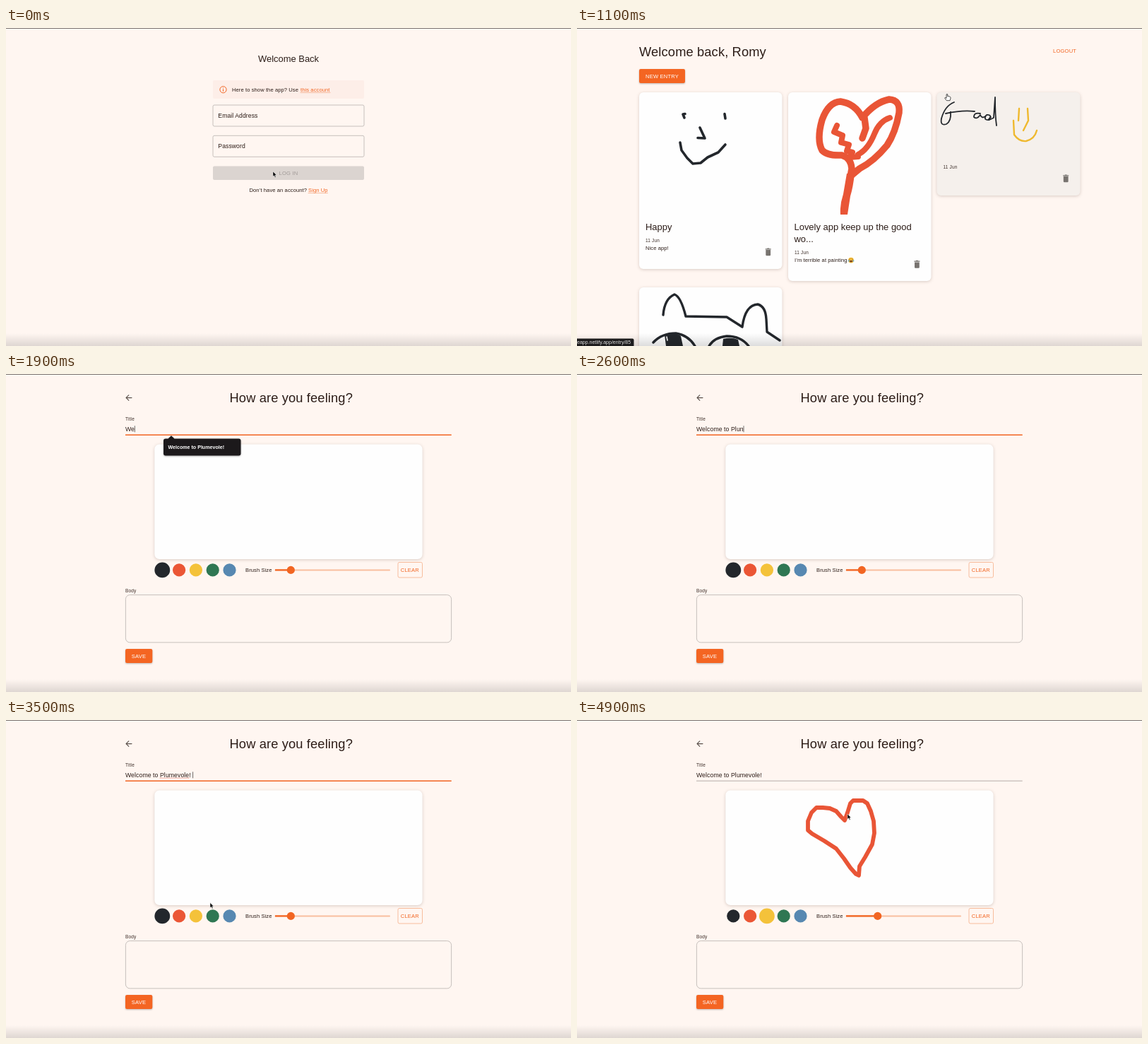
Recreate the animation shown at these times as an HTML page. Size 800 by 450 pixels, loop 5000 ms.

```html
<!DOCTYPE html>
<html lang="en">
<head>
<meta charset="utf-8">
<title>Mood journal</title>
<style>
html, body { margin: 0; width: 100%; height: 100%; overflow: hidden; background: #fff6f1; }
svg { display: block; width: 800px; height: 450px; font-family: "Liberation Sans", Arial, sans-serif; }
text { white-space: pre; }
.card { fill: #fefefe; filter: drop-shadow(0 1px 2px rgba(60, 30, 15, .2)); }
.line { fill: none; stroke-linecap: round; stroke-linejoin: round; }
</style>
</head>
<body>
<svg id="stage" viewBox="0 0 800 450"></svg>
<script>
const INK = '#2c1d18', ORANGE = '#f26522', GREY = '#c6c0bc', BLACK = '#23272c', RED = '#e95536';
const LOOP = 5000, STEP = 100;
const TITLE = 'Welcome to Plumevole! ';

// Markup helpers
const text = (x, y, s, size, fill = INK, gap = 0.08, more = '') =>
  `<text x="${x}" y="${y}" font-size="${size}" fill="${fill}" letter-spacing="${gap}" ${more}>${s}</text>`;
const body = (x, y, s, fill) => text(x, y, s, 7.6, fill);
const caps = (x, y, s, fill) => text(x, y, s, 7.55, fill, 0.215);
const small = (x, y, s) => text(x, y, s, 6.46, '#3f302b', 0.2);
const head = (x, y, s) => text(x, y, s, 18.3, INK, 0.135);
const box = (x, y, w, h, r, more) => `<rect x="${x}" y="${y}" width="${w}" height="${h}" rx="${r}" ${more}/>`;
const line = (d, color, w, more = '') =>
  `<path class="line" d="${d}" stroke="${color}" stroke-width="${w}" ${more}/>`;
const link = (x, y, s, w) => body(x, y, s, ORANGE) + line(`M${x} ${y + 1.4}h${w}`, '#f5a27a', 0.7);
const field = (y, s) =>
  box(293, y, 214, 30, 2, `fill="none" stroke="${GREY}"`) + text(300.3, y + 17.8, s, 8.65);
const button = (x, y, w, h, more = '') => box(x, y, w, h, 2.2,
  `fill="#f46522" style="filter:drop-shadow(0 1px 1px rgba(0,0,0,.25))" ${more}`);
const bin = (x, y) => `<g transform="translate(${x} ${y})" fill="#77736f">
  <path d="M-4 -4.8h2.2l.7 -.8h2.2l.7 .8h2.2v1.2h-8z"/><path d="M-3.4 -2.9h6.8v7a1.2 1.2 0 0 1 -1.2 1.2h-4.4a1.2 1.2 0 0 1 -1.2 -1.2z"/></g>`;

const login = `<g id="login">
  ${text(400, 48.3, 'Welcome Back', 12.95, INK, 0, 'text-anchor="middle"')}
  ${box(293, 74, 214, 26, 2, 'fill="#fdeee8"')}
  <circle cx="307.5" cy="87.2" r="4.6" fill="none" stroke="${ORANGE}"/>
  ${line('M307.5 86.8v2.6M307.5 84.8v.1', ORANGE, 1)}
  ${body(320, 90, 'Here to show the app? Use')}
  ${link(417, 90, 'this account', 42)}
  ${field(109, 'Email Address')}${field(152.3, 'Password')}
  ${box(293, 195.5, 214, 19.5, 2, 'fill="#dbd4d0"')}
  ${caps(386.5, 208.2, 'LOG IN', '#a19a97')}
  ${body(344.5, 232.2, 'Don’t have an account?')}
  ${link(428, 232.2, 'Sign Up', 27.5)}
</g>`;

const face = line('M153 121.5L150 122L152 127M209 121.5L210 128M174 141L181 156L171 155.5' +
  'M146 162L148 173L156 184L164 192L175 191L185 183L200 176L210 165', BLACK, 3.6);
const bigHeart =
  line('M404 127Q394 107 373 104Q356 105 347 130Q339 158 347 173Q354 181 375 180Q388 184 389 199L386 216' +
    'M404 127Q422 105 442 101Q458 102 456 120Q451 148 439 166Q420 189 400 199L388 209' +
    'M404 156L409 142L407 127', RED, 9.5) +
  line('M368 138L364 147L376 152L374 162L385 165L382 174L390 176L386 183L398 182' +
    'M443 127Q428 132 421 150Q412 172 398 179', RED, 8) +
  `<path d="M382 206L393 206Q391 225 387 238L383 264H373Q372 250 377 235Z" fill="${RED}"/>`;
const scrawl =
  line('M534 105Q521 110 516 128Q514 139 523 136Q530 132 529 119M522 121Q545 116 563 118' +
    'M571 121Q562 119 562 126Q566 130 571 123Q574 130 580 123Q588 122 584 130Q575 131 579 124' +
    'M586 126Q578 133 590 127L592 98Q592 124 594 138', BLACK, 1.8) +
  line('M626 114L625 131M638 114L639 131L632 145M618 131L619 151Q626 161 636 160Q648 157 651 145',
    '#efb92f', 2.4);
const cat =
  line('M122 406Q124 383 138 377Q147 380 154 408L212 409L234 423Q238 392 256 391Q267 394 268 412L269 430L287 442' +
    'M108 445Q120 432 140 432Q158 435 167 450M187 450Q194 438 212 436Q232 436 243 450', BLACK, 3.4) +
  `<path d="M124 434Q138 430 147 436L150 450H126Z" fill="${BLACK}"/>
   <path d="M207 440Q218 437 228 441L230 450H206Z" fill="${BLACK}"/>` +
  line('M127 437L128 442', '#fefefe', 1.6);
const laugh = `<circle cx="388" cy="328.6" r="3.9" fill="#f3bd3a"/>
  <path d="M385.6 329h4.8a2.4 2.4 0 0 1 -4.8 0z" fill="#7a4420"/>
  ${line('M385.6 327.5l1.2 -.6M390.4 327.5l-1.2 -.6', '#7a4420', 0.6)}
  <circle cx="384.6" cy="329.6" r="1" fill="#58a9dc"/><circle cx="391.4" cy="329.6" r="1" fill="#58a9dc"/>`;

const home = `<g id="home">
  ${head(88, 39.8, 'Welcome back, Romy')}
  ${caps(674, 34.8, 'LOGOUT', ORANGE)}
  ${button(88, 58, 65, 20)}${caps(97, 70.6, 'NEW ENTRY', '#fff')}
  ${box(88, 91, 202.5, 250, 6, 'class="card"')}
  ${box(299, 91, 202.5, 267, 6, 'class="card"')}
  ${box(509.5, 91, 203, 146, 6, 'class="card" id="third"')}
  ${box(88, 367, 202.5, 120, 6, 'class="card"')}
  ${face}${bigHeart}${scrawl}${cat}
  ${text(97, 286, 'Happy', 12.95, INK, 0)}
  ${text(307.5, 286, 'Lovely app keep up the good', 12.95, INK, 0)}
  ${text(307.5, 303.3, 'wo...', 12.95, INK, 0)}
  ${small(97, 302.6, '11 Jun')}${small(308, 320, '11 Jun')}${small(518.5, 198.6, '11 Jun')}
  ${body(97, 314, 'Nice app!')}${body(308, 331.3, 'I’m terrible at painting')}${laugh}
  ${bin(270.7, 317)}${bin(481.4, 334.4)}${bin(692.2, 213)}
</g>`;

const swatches = [BLACK, '#eb5635', '#f4c23a', '#2f7753', '#5788b1']
  .map((c, i) => `<circle class="swatch" cx="${221.3 + i * 23.8}" cy="277.4" fill="${c}"/>`).join('');
const heart = 'M379 142L374 137L367 129L358 125L348 124L339 124L332 131L327 143L327 156L333 161L350 171L367 182' +
  'L378 196L387 209L395 218L399 220L400 207L408 194L418 176L421 160L420 143L416 129L411 118L405 114' +
  'L391 114L387 118L383 131L379 142';

const form = `<g id="form">
  ${line('M178 33.6H170.3M173.8 29.8L170 33.6L173.8 37.4', '#5c514c', 1.1)}
  ${head(316.5, 39.8, 'How are you feeling?')}
  ${small(169, 65.8, 'Title')}
  ${text(169, 80.7, '', 8.7, INK, 0.08, 'id="typed"')}
  <path id="rule" d="M169 86.2H630.7"/>
  <path id="spell" d="M218 82.2H259" stroke="#e04a3c" stroke-width=".8" stroke-dasharray="1 1"/>
  <path id="caret" d="M0 73.3V82.3" stroke="#333" stroke-width=".7"/>
  ${box(210.3, 99.5, 379.3, 162.5, 7, 'class="card"')}
  ${line(heart, RED, 5.8, 'id="heart"')}
  ${swatches}
  ${body(339, 280.2, 'Brush Size')}
  ${line('M381.5 277.4H543', '#f9bf9f', 2)}
  <path id="fill" stroke="${ORANGE}" stroke-width="2.2"/>
  <circle id="thumb" cy="277.4" r="5.6" fill="${ORANGE}"/>
  ${box(555, 266.5, 34.5, 21.5, 2, 'fill="none" stroke="#f8bd9d"')}
  ${caps(558.8, 280.1, 'CLEAR', ORANGE)}
  ${small(169, 309, 'Body')}
  ${box(169.4, 312.6, 461.2, 67.3, 6, `fill="none" stroke="${GREY}"`)}
  ${button(169, 389, 38.3, 20)}${caps(177.8, 401.6, 'SAVE', '#fff')}
  <g id="hint">
    <path d="M223 94.5a3 3 0 0 1 3 -3h3.5l4.5 -4.2l4.5 4.2h91a3 3 0 0 1 3 3v18a3 3 0 0 1 -3 3h-103.500a3 3 0 0 1 -3 -3z"
      fill="#1c191b" style="filter:drop-shadow(0 1px 1px rgba(0,0,0,.3))"/>
    ${text(229.5, 106, TITLE.trim(), 7.1, '#fff', 0, 'font-weight="bold"')}
  </g>
</g>`;

const frame = `<defs><linearGradient id="fade" x2="0" y2="1">
    <stop offset="0" stop-color="#000" stop-opacity="0"/>
    <stop offset="1" stop-color="#000" stop-opacity=".13"/></linearGradient></defs>
  ${box(0, 432, 800, 18, 0, 'fill="url(#fade)"')}
  ${box(0, 0, 800, 1, 0, 'fill="#77716e"')}
  <g id="status">${box(-4, 439.5, 84.5, 14, 2, 'fill="#1d1c1d"')}
    ${text(0, 447.4, 'eapp.netlify.app/entry/85', 7, '#dcdcdc', 0)}</g>
  <path id="arrow" d="M0 0V7.2L1.7 5.8L2.9 8.4L4.1 7.9L3 5.3H5.1Z" fill="#000" stroke="#fff" stroke-width=".5"/>
  <path id="hand" d="M-.9 .4Q0 -.6 .8 .4V3.2Q3 2.6 4.600 4.1Q5.200 4.500 4.900 6.500L4 9.200H-.7L-3.300 5.800Q-3.200 4.600 -1.900 5.100L-.9 6Z"
    fill="#fff" stroke="#222" stroke-width=".8" stroke-linejoin="round"/>`;

const stage = document.getElementById('stage');
stage.innerHTML = box(0, 0, 800, 450, 0, 'fill="#fff6f1"') + login + home + form + frame;
const el = {};
stage.querySelectorAll('[id]').forEach(n => el[n.id] = n);
const dots = [...stage.querySelectorAll('.swatch')];
const heartLen = el.heart.getTotalLength();

// Pointer track: time, x, y, shape used from that time on
const track = [
  [0, 378, 203, 'arrow'], [100, 362, 222, 'arrow'], [200, 385, 170, 'arrow'], [400, 462, 92, 'arrow'],
  [500, 442, 86, 'hand'], [700, 438, 85, 'arrow'], [1000, 518, 95, 'hand'], [1100, 524, 93.5, 'hand'],
  [1200, 300, 82, 'arrow'], [1300, 125, 68, 'hand'], [1400, 124.6, 68, 'arrow'], [1600, 205, 76, 'arrow'],
  [1700, 215, 77, ''], [3300, 250, 160, 'arrow'], [3500, 289, 258.5, 'arrow'], [3600, 245, 276, 'hand'],
  [3700, 403, 276, 'hand'], [3900, 425, 276, 'hand'], [4000, 379, 142, 'arrow'],
  [4600, 379, 142, 'arrow'], [4800, 268, 276, 'hand'], [4900, 383, 133, 'arrow']
];
// Typing: time, letters shown
const keys = [[0, 0], [1800, 1], [1900, 2], [2000, 4], [2100, 6], [2200, 8], [2300, 10], [2400, 11], [2500, 13],
  [2700, 14], [2800, 15], [2900, 17], [3000, 19], [3100, 21], [3200, 22]];

const last = (table, t) => table.findLastIndex(row => row[0] <= t);
const show = (node, on) => node.style.display = on ? '' : 'none';
const clamp = v => Math.max(0, Math.min(1, v));

function pointer(t) {
  const i = last(track, t), a = track[i], b = track[i + 1] || a;
  const k = b === a ? 0 : (t - a[0]) / (b[0] - a[0]);
  return { x: a[1] + (b[1] - a[1]) * k, y: a[2] + (b[2] - a[2]) * k, shape: a[3] };
}

function typedText(t) {
  if (t === 2600) return TITLE.slice(0, 14) + 'n';
  return TITLE.slice(0, keys[last(keys, t)][1]);
}

function drawForm(t) {
  const s = typedText(t), focus = t >= 1700 && t < 3600;
  el.typed.textContent = s;
  el.rule.setAttribute('stroke', focus ? ORANGE : '#a39c98');
  el.rule.setAttribute('stroke-width', focus ? 1.4 : 0.8);
  show(el.caret, focus);
  const w = s ? el.typed.getComputedTextLength() : 0;
  el.caret.setAttribute('transform', `translate(${169.3 + w} 0)`);
  show(el.spell, focus && s === TITLE);
  show(el.hint, s && s.length < 21 && TITLE.startsWith(s));

  const pick = t < 3600 ? 0 : t < 4900 ? 1 : 2;
  dots.forEach((d, i) => d.setAttribute('r', i === pick ? 10.9 : 9.1));
  const x = 403.3 + 22.4 * clamp((t - 3700) / 200);
  el.thumb.setAttribute('cx', x);
  el.fill.setAttribute('d', `M381 277.4H${x}`);

  const k = clamp((t - 4000) / 600);
  show(el.heart, k > 0);
  el.heart.setAttribute('stroke-dasharray', `${heartLen * k + (k === 1 ? 9 : 0)} ${heartLen * 2}`);
}

function draw(t) {
  show(el.login, t < 700);
  show(el.home, t >= 700 && t < 1400);
  show(el.form, t >= 1400);
  const over = t === 1000 || t === 1100;
  show(el.status, over);
  el.third.style.fill = over ? '#f5f0ec' : '';
  if (t >= 1400) drawForm(t);

  const p = pointer(t);
  if (t > 4000 && t < 4600) Object.assign(p, (({ x, y }) => ({ x, y }))(
    el.heart.getPointAtLength(heartLen * (t - 4000) / 600)));
  for (const name of ['arrow', 'hand']) {
    show(el[name], p.shape === name);
    el[name].setAttribute('transform', `translate(${p.x} ${p.y})`);
  }
}

const start = performance.now();
function tick(now) {
  const t = Math.max(0, now - start) % LOOP;
  draw(Math.floor(t / STEP) * STEP);
  requestAnimationFrame(tick);
}
draw(0);
requestAnimationFrame(tick);
</script>
</body>
</html>
```
